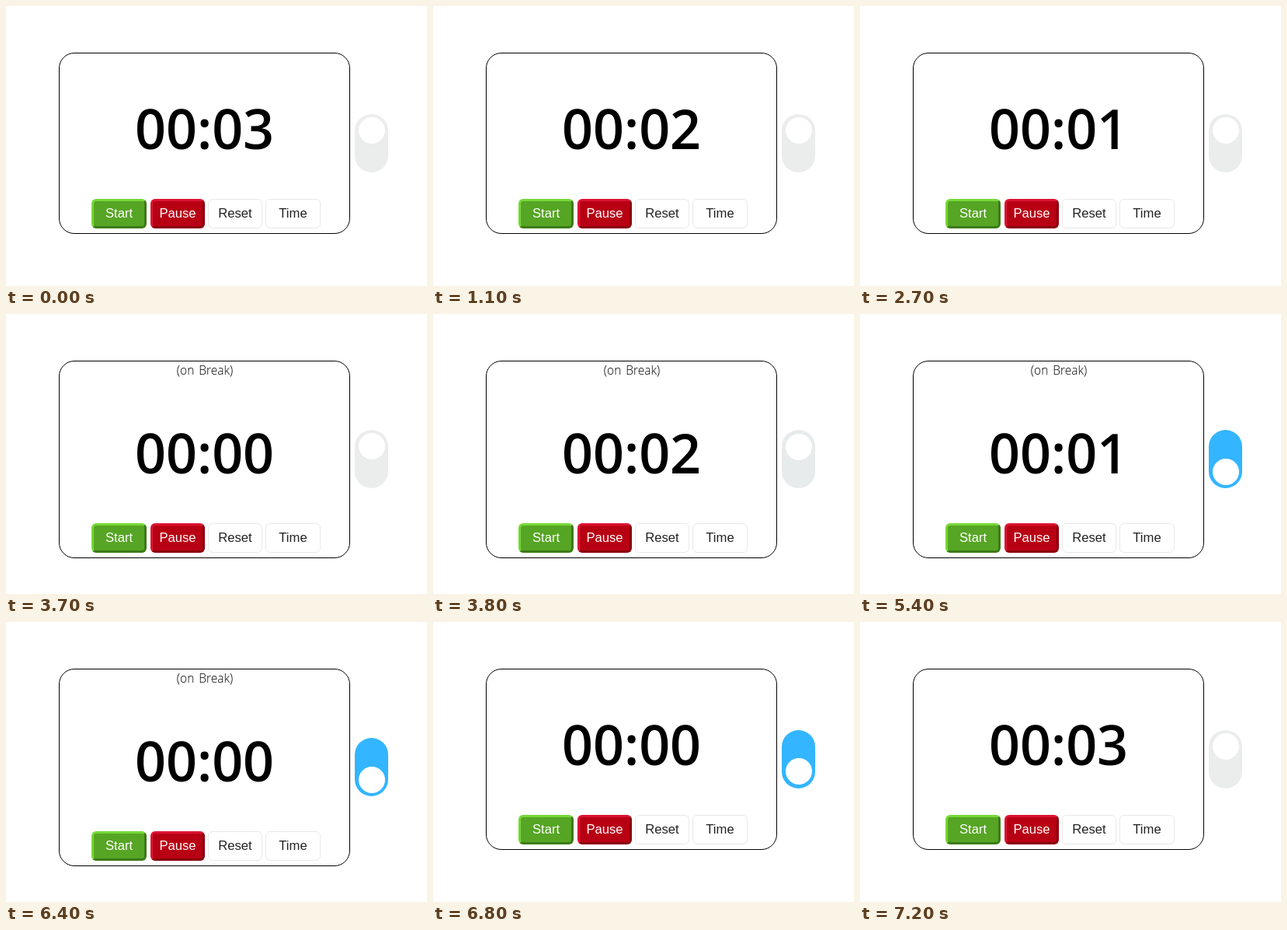
Animation, 542 px wide and 360 px high, one loop 7800 ms. Source, as an HTML page:

```html
<!DOCTYPE html>
<html lang="en">
<head>
<meta charset="utf-8">
<title>Countdown</title>
<style>
  html, body { margin: 0; width: 100%; height: 100%; overflow: hidden; background: #fff; }
  div { position: absolute; box-sizing: border-box; text-align: center; white-space: pre; }
  #card { left: 68px; top: 60px; width: 375px; border: 1px solid #000; border-radius: 20px; }
  #note { left: 156px; top: 62px; width: 200px; font: 300 15.5px/20px "Open Sans", sans-serif; word-spacing: 2px; }
  #clock { left: 166px; top: 122px; font: 600 70px/70px "Open Sans", sans-serif; }
  .button { top: 248px; width: 71px; height: 38px; border: 1px solid #e8e8e8; border-radius: 6px;
    font: 16.67px/35px "Liberation Sans", Arial, sans-serif; color: #222; }
  .start, .pause { border-width: 3px; line-height: 31px; color: #fff; }
  .start { background: #56a524; border-color: #76d836 #3d7a18 #3d7a18 #76d836; }
  .pause { background: #b80014; border-color: #dc1433 #8a000f #8a000f #dc1433; }
  #toggle { left: 449px; width: 43px; height: 75px; border-radius: 22px; }
  #knob { left: 4.5px; width: 34px; height: 34px; border-radius: 50%; background: #fff; }
</style>
</head>
<body>
<div id="card"></div>
<div id="note">(on Break)</div>
<div id="clock"></div>
<div class="button start" style="left:110px">Start</div>
<div class="button pause" style="left:186px;width:70px">Pause</div>
<div class="button" style="left:260px;width:70px">Reset</div>
<div class="button" style="left:334px">Time</div>
<div id="toggle"><div id="knob"></div></div>
<script>
const LOOP = 7800, STEP = 100, FADE = 400;
const OFF = [235, 236, 236], ON = [51, 181, 255];
const $ = id => document.getElementById(id);
const shifted = [$('clock'), ...document.querySelectorAll('.button')];

// Cubic Bezier (.25, .1, .25, 1), solved for x by bisection
function ease(x) {
  if (x <= 0 || x >= 1) return x <= 0 ? 0 : 1;
  const curve = (u, a, b) => 3 * u * (1 - u) ** 2 * a + 3 * u * u * (1 - u) * b + u ** 3;
  let low = 0, high = 1;
  for (let i = 0; i < 20; i++) {
    const mid = (low + high) / 2;
    if (curve(mid, .25, .25) < x) low = mid; else high = mid;
  }
  return curve(low, .1, 1);
}

function secondsAt(t) {
  if (t >= 6900) return 3;
  if (t >= 3800) return Math.max(0, 2 - Math.floor((t - 3800) / 1000));
  return Math.max(0, 3 - Math.floor((t + 200) / 1000));
}

function draw(now) {
  const t = Math.floor(now % LOOP / STEP) * STEP;
  const onBreak = t >= 3700 && t < 6800;
  const extra = onBreak ? 21 : 0;

  $('card').style.height = 233 + extra + 'px';
  $('note').style.visibility = onBreak ? 'visible' : 'hidden';
  for (const el of shifted) el.style.transform = `translateY(${extra}px)`;
  $('clock').textContent = '00:0' + secondsAt(t);

  const on = ease((t - 3785) / FADE) - ease((t - 6820) / FADE);
  const color = OFF.map((c, i) => Math.round(c + (ON[i] - c) * on));
  $('toggle').style.top = 138.5 + extra / 2 + 'px';
  $('toggle').style.background = `rgb(${color})`;
  $('knob').style.top = 4.25 + 32.5 * on + 'px';
}

const begin = performance.now();
function tick() {
  draw(performance.now() - begin);
  requestAnimationFrame(tick);
}
tick();
</script>
</body>
</html>
```
